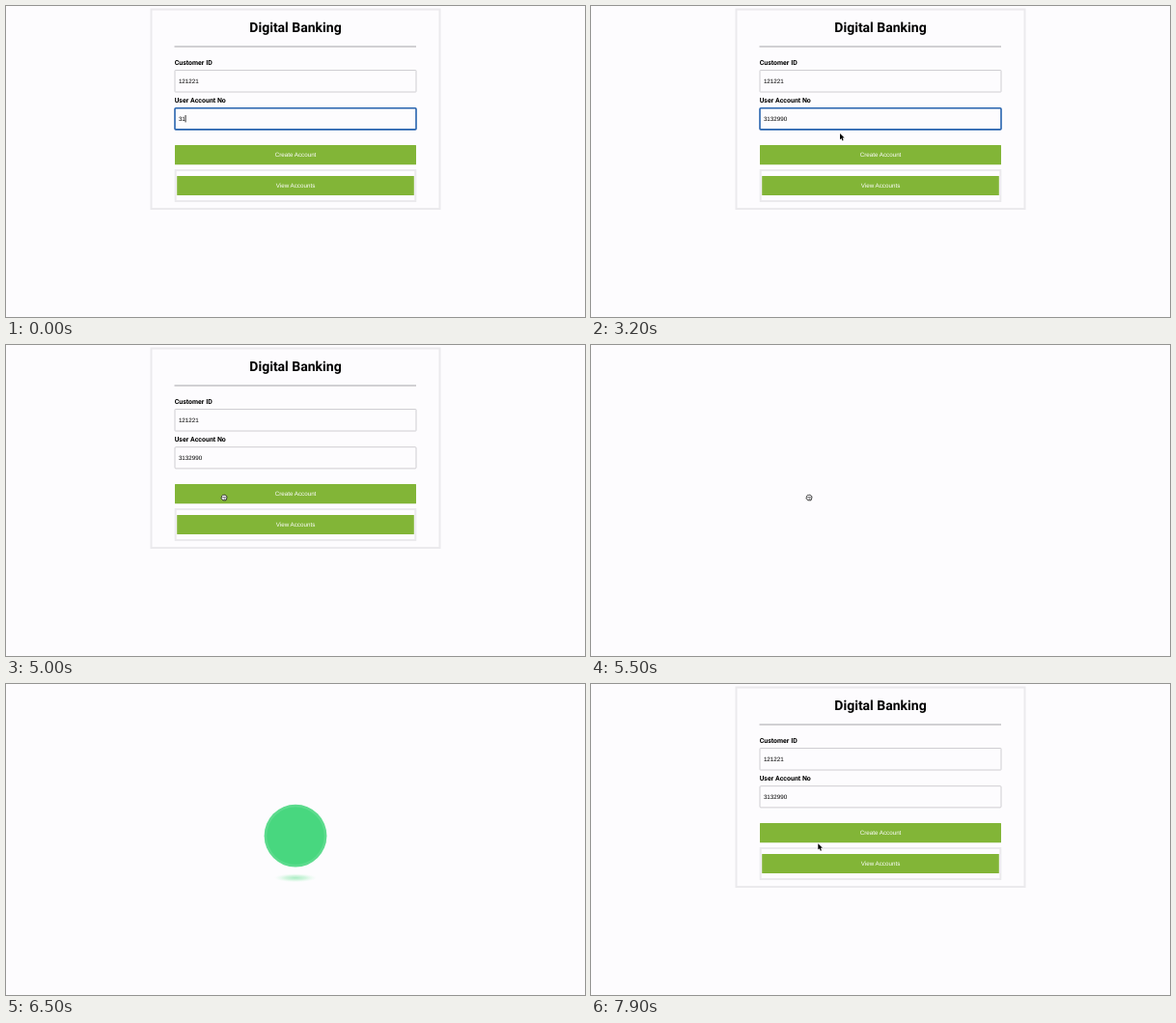
Recreate the animation shown at these times as an HTML page. Size 600 by 322 pixels, loop 8000 ms.

```html
<!DOCTYPE html>
<html lang="en">
<head>
<meta charset="utf-8">
<title>Account form</title>
<style>
  html, body { margin: 0; width: 100%; height: 100%; overflow: hidden; background: #fdfcfe; }
  svg { display: block; width: 600px; height: 322px; }
  text { text-rendering: geometricPrecision; }
  .title, .label { font-family: Roboto, Arial, sans-serif; font-weight: 700; fill: #000; }
  .title { font-size: 14px; text-anchor: middle; }
  .label { font-size: 7px; }
  .value, .caption { font: 6.25px "Liberation Sans", Arial, sans-serif; }
  .caption { fill: #fff; text-anchor: middle; }
  .panel { fill: none; stroke: #ebeaed; stroke-width: 2; }
  .field { fill: #fdfcfe; stroke: #cfced2; }
  .field.focus { stroke: #2763ae; stroke-width: 1.6; }
  .button rect { fill: #82b537; }
  .green { fill: #48d77f; }
</style>
</head>
<body>
<svg viewBox="0 0 600 322">
  <defs>
    <radialGradient id="shade">
      <stop offset="0" stop-color="#a9ecc3"/>
      <stop offset=".5" stop-color="#c9f3d8" stop-opacity=".8"/>
      <stop offset="1" stop-color="#e6faed" stop-opacity="0"/>
    </radialGradient>
  </defs>

  <g id="form">
    <rect class="panel" x="150.5" y="3.5" width="299" height="206.5"/>
    <text class="title" x="300" y="27">Digital Banking</text>
    <path d="M174.5 42H425" stroke="#a5a4a8"/>
    <text class="label" x="174.7" y="60.6">Customer ID</text>
    <rect class="field" x="175" y="66.5" width="250" height="22.5" rx=".5"/>
    <text class="value" x="178.9" y="80">121221</text>
    <text class="label" x="174.7" y="99.6">User Account No</text>
    <rect class="field" id="account" x="175" y="105.7" width="250" height="22.2" rx="1"/>
    <text class="value" id="number" x="178.9" y="119.1"></text>
    <rect id="caret" y="113" width=".8" height="7.4"/>
    <g class="button" id="create">
      <rect x="175" y="144" width="250" height="20.3" rx=".5"/>
      <text class="caption" x="300" y="156.4">Create Account</text>
    </g>
    <rect class="panel" x="175.7" y="170" width="248.6" height="32"/>
    <g class="button" id="view">
      <rect x="177.2" y="176" width="245.6" height="20" rx=".5"/>
      <text class="caption" x="300" y="188.3">View Accounts</text>
    </g>
  </g>

  <g id="success">
    <ellipse id="shadow" cx="300" fill="url(#shade)"/>
    <circle class="green" id="outer" cx="300" cy="157.2"/>
    <circle class="green" id="middle" cx="300" cy="157.2" opacity=".45"/>
    <circle class="green" id="inner" cx="300" cy="157.2"/>
    <path id="check" d="M284.5 159.5L297 171L315.7 148.5" fill="none" stroke="#fdfcfe"
      stroke-width="7" stroke-linecap="round" stroke-linejoin="round"
      pathLength="1" stroke-dasharray="1 2"/>
  </g>

  <path id="arrow" d="M0 0V6.3L1.5 5L2.5 7.5L3.6 7L2.6 4.6H4.6Z"
    stroke="#fff" stroke-width=".5" paint-order="stroke"/>
  <g id="hand" fill="#fdfcfe" stroke="#222" stroke-width=".9" stroke-linejoin="round">
    <path d="M-2.4 -1.7Q-1.6 -3.1 -.4 -2.6Q1 -3.2 1.9 -2.1Q3.2 -1.8 2.9 .1L2 2.8H-1.2L-3 .5Q-3 -.5 -2.1 -.3Z"/>
    <path d="M-1.5 -.3H1.8M-.3 1.2H1.4" stroke-width=".7"/>
  </g>
</svg>

<script>
const LOOP = 8000, STEP = 100, BLINK = 500, DIGIT = 3.475;
const $ = id => document.getElementById(id);
const set = (id, attrs) => {
  for (const name in attrs) $(id).setAttribute(name, attrs[name]);
};
const show = (id, on) => set(id, { visibility: on ? "visible" : "hidden" });
const within = (t, from, to) => t >= from && t < to;

// Linear track of [time, value] pairs, clamped at both ends.
function track(keys, t) {
  if (t <= keys[0][0]) return keys[0][1];
  for (let i = 1; i < keys.length; i++) {
    const [t0, a] = keys[i - 1], [t1, b] = keys[i];
    if (t < t1) return a + (b - a) * (t - t0) / (t1 - t0);
  }
  return keys[keys.length - 1][1];
}

const keystrokes = [[-300, "31"], [200, "3"], [800, "2"], [1900, "9"], [2100, "9"], [2400, "0"]];

const outerR = [[5800, 0], [6000, 24], [6200, 38.4], [6300, 38], [6600, 29.6]];
const middleR = [[5900, 0], [6200, 24], [6400, 29.6]];
const innerR = [[6000, 0], [6200, 13.2], [6500, 29.6]];
const outerAlpha = [[6200, .55], [6600, 1]];
const checkDrawn = [[6500, 0], [6700, .55], [6800, .88], [7000, 1]];
const shadowR = [[5900, 0], [6200, 13], [6600, 25]];
const shadowY = [[6200, 203], [6600, 200]];

// Each move: start, end, x track, y track.
const moves = [
  [3200, 5900, [[3200, 258], [3700, 226]], [[3200, 132], [3500, 153], [3700, 158]]],
  [5900, 6500, [[5900, 214], [6200, 74], [6400, 40]], [[5900, 148], [6200, 28], [6400, -6]]],
  [7500, 7800, [[7500, 230]], [[7500, 155]]],
  [7800, 7900, [[7800, 233]], [[7800, 184]]],
  [7900, 8000, [[7900, 235.3]], [[7900, 165.2]]]
];

function drawForm(t) {
  const visible = t < 5500 || t >= 7300;
  $("form").style.display = visible ? "" : "none";
  const typed = keystrokes.filter(([at]) => at <= t);
  const value = typed.map(([, key]) => key).join("");
  const last = typed[typed.length - 1][0];
  const focused = t < 5000;
  $("number").textContent = value;
  $("account").classList.toggle("focus", focused);
  set("caret", { x: 178.7 + value.length * DIGIT });
  $("caret").style.display = focused && Math.floor((t - last) / BLINK) % 2 === 0 ? "" : "none";

  const pressed = within(t, 5000, 5100);
  const onCreate = within(t, 3500, 5500) && !pressed || within(t, 7500, 7800);
  set("create", { opacity: onCreate ? .78 : 1 });
  set("view", { opacity: within(t, 7800, 7900) ? .78 : 1 });
}

function drawSuccess(t) {
  $("success").style.display = within(t, 5900, 7300) ? "" : "none";
  set("outer", { r: track(outerR, t), opacity: track(outerAlpha, t) });
  set("middle", { r: track(middleR, t) });
  set("inner", { r: track(innerR, t) });
  const drawn = track(checkDrawn, t);
  set("check", { "stroke-dashoffset": 1 - drawn, opacity: drawn > 0 ? 1 : 0 });
  const r = track(shadowR, t);
  set("shadow", { cy: track(shadowY, t), rx: r, ry: Math.min(4.5, r / 4) });
}

function drawPointer(t) {
  const move = moves.find(([from, to]) => within(t, from, to));
  const hand = within(t, 3500, 5600) || within(t, 7500, 7900);
  show("hand", move && hand);
  show("arrow", move && !hand);
  if (!move) return;
  const place = `translate(${track(move[2], t)} ${track(move[3], t)})`;
  set(hand ? "hand" : "arrow", { transform: place });
}

const start = performance.now();
function render() {
  const elapsed = (performance.now() - start) % LOOP;
  const t = Math.floor(elapsed / STEP) * STEP;
  drawForm(t);
  drawSuccess(t);
  drawPointer(t);
  requestAnimationFrame(render);
}
render();
</script>
</body>
</html>
```
